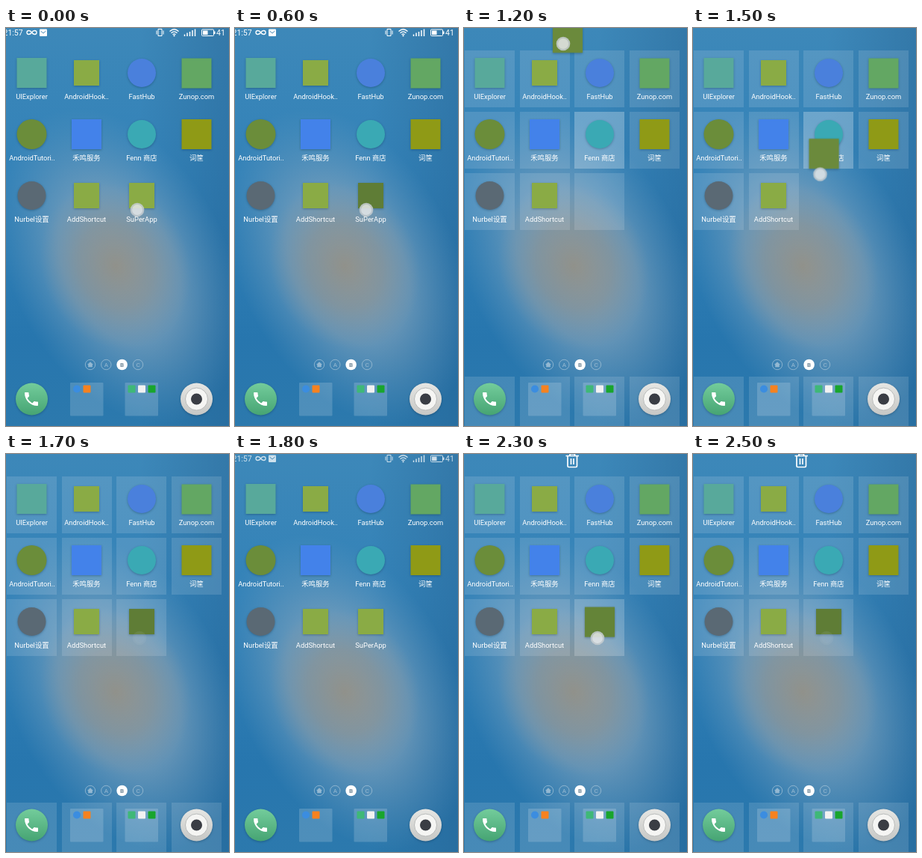
Animation, 299 px wide and 532 px high, one loop 2.6 s. Source, as an HTML page:

```html
<!DOCTYPE html>
<html lang="zh">
<head>
<meta charset="utf-8">
<title>Launcher</title>
<style>
html, body { margin: 0; width: 100%; height: 100%; overflow: hidden; background: #2c7bb2; }
svg { display: block; width: 100vw; height: 100vh; }
text { font: 9.4px Roboto, "Noto Sans CJK SC", "Noto Sans CJK", sans-serif; fill: #fff; text-anchor: middle; }
.bar text { font-size: 10.5px; text-anchor: start; }
.icons > *, .app { filter: drop-shadow(0 1.5px 1.5px rgba(0, 25, 50, .3)); }
.cell { fill: #fff; fill-opacity: .13; }
.line { fill: none; stroke: #fff; }
.pages { fill: none; stroke: #b9d0df; stroke-opacity: .6; }
.pages text { font-size: 8px; fill: #b9d0df; fill-opacity: .75; stroke: none; }
.pages .on { fill: #6f8798; fill-opacity: 1; font-weight: 700; }

/* The screen updates ten times a second, so every change is a hard step. */
.bar, .name, .edit, .trash, .slot, .hot, .app, .touch { animation: 2.6s step-end infinite; }
.bar { animation-name: bar; }
.name { animation-name: name; }
.edit { animation-name: edit; }
.trash { animation-name: trash; }
.slot { animation-name: slot; }
.hot { animation-name: hot; }
.app { animation-name: drag; }
.touch { animation-name: touch; }

@keyframes bar {
  0%, 73.07%, 100% { opacity: 1; }
  38.46%, 80.76% { opacity: 0; }
  69.23% { opacity: .75; }
}
@keyframes name {
  0%, 69.23%, 100% { opacity: 1; }
  38.46%, 80.76% { opacity: 0; }
}
@keyframes edit {
  0%, 69.23%, 100% { opacity: 0; }
  38.46%, 80.76% { opacity: 1; }
}
@keyframes trash {
  0%, 46.15%, 100% { opacity: 0; }
  38.46%, 80.76% { opacity: 1; }
}
@keyframes slot {
  0%, 61.53%, 80.76% { fill-opacity: .2; }
  42.3%, 65.38%, 96.15%, 100% { fill-opacity: .13; }
  57.69% { fill-opacity: 0; }
}
@keyframes hot {
  0%, 61.53%, 100% { fill-opacity: .13; }
  42.3% { fill-opacity: .27; }
}
@keyframes drag {
  0%, 69.23%, 100% { transform: translate(182px, 224px); fill: #8aab45; }
  23.07%, 65.38%, 76.92%, 96.15% { transform: translate(182px, 224px); fill: #5f7d36; }
  38.46%, 61.53%, 80.76% { transform: translate(182px, 224.5px) scale(1.18); fill: #648438; }
  42.3% { transform: translate(161px, 122px) scale(1.18); fill: #6b8a3c; }
  46.15% { transform: translate(139px, 13px) scale(1.18); fill: #6b8a3c; }
  50% { transform: translate(151px, 55px) scale(1.18); fill: #6b8a3c; }
  53.84% { transform: translate(163px, 111px) scale(1.18); fill: #6b8a3c; }
  57.69% { transform: translate(175.5px, 168px) scale(1.18); fill: #6b8a3c; }
}
@keyframes touch {
  0%, 100% { transform: translate(176px, 243px); opacity: .88; }
  42.3% { transform: translate(155px, 132px); opacity: .88; }
  46.15% { transform: translate(133px, 21px); opacity: .88; }
  50% { transform: translate(145px, 79px); opacity: .88; }
  53.84% { transform: translate(158px, 138px); opacity: .88; }
  57.69% { transform: translate(170.5px, 195.5px); opacity: .88; }
  61.53%, 73.07% { transform: translate(179px, 246px); opacity: .88; }
  65.38%, 96.15% { transform: translate(179px, 246px); opacity: .1; }
  69.23% { transform: translate(179px, 246px); opacity: 0; }
}
</style>
</head>
<body>
<svg viewBox="0 0 299 532" preserveAspectRatio="none">
  <defs>
    <linearGradient id="sky" x2="0" y2="1">
      <stop stop-color="#3d88b9"/>
      <stop offset=".35" stop-color="#3382b8"/>
      <stop offset=".78" stop-color="#2776ae"/>
      <stop offset="1" stop-color="#2c79ad"/>
    </linearGradient>
    <linearGradient id="shade">
      <stop offset=".6" stop-color="#1f5583" stop-opacity="0"/>
      <stop offset="1" stop-color="#1f5583" stop-opacity=".3"/>
    </linearGradient>
    <radialGradient id="haze">
      <stop stop-color="#93a9b8" stop-opacity=".85"/>
      <stop offset=".5" stop-color="#87a6bd" stop-opacity=".6"/>
      <stop offset="1" stop-color="#6a9cc0" stop-opacity="0"/>
    </radialGradient>
    <radialGradient id="sand">
      <stop stop-color="#958c7c" stop-opacity=".75"/>
      <stop offset=".5" stop-color="#938f86" stop-opacity=".48"/>
      <stop offset="1" stop-color="#8f9aa0" stop-opacity="0"/>
    </radialGradient>
    <linearGradient id="call" x2="0" y2="1">
      <stop stop-color="#73cc9b"/>
      <stop offset="1" stop-color="#46a473"/>
    </linearGradient>
    <linearGradient id="rim" x2="0" y2="1">
      <stop stop-color="#e6e6e3"/>
      <stop offset="1" stop-color="#c6c7c5"/>
    </linearGradient>
    <rect id="cell" width="67" height="76"/>
    <rect id="tile" x="-20" y="-20" width="40" height="40"/>
    <rect id="small" x="-17" y="-17" width="34" height="34"/>
    <rect id="mini" x="-5" y="-5" width="10" height="10" rx="1"/>
  </defs>

  <rect width="299" height="532" fill="url(#sky)"/>
  <rect width="299" height="532" fill="url(#shade)"/>
  <ellipse cx="152" cy="318" rx="145" ry="225" fill="url(#haze)" transform="rotate(-27 152 318)"/>
  <ellipse cx="147" cy="318" rx="98" ry="115" fill="url(#sand)" transform="rotate(-27 147 318)"/>

  <g class="edit">
    <g class="cell">
      <use href="#cell" x="1" y="30"/><use href="#cell" x="75" y="30"/>
      <use href="#cell" x="148" y="30"/><use href="#cell" x="222" y="30"/>
      <use href="#cell" x="1" y="112"/><use href="#cell" x="75" y="112"/>
      <use href="#cell" x="222" y="112"/>
      <use href="#cell" x="1" y="194"/><use href="#cell" x="75" y="194"/>
      <use href="#cell" x="1" y="466"/><use href="#cell" x="75" y="466"/>
      <use href="#cell" x="148" y="466"/><use href="#cell" x="222" y="466"/>
    </g>
    <use class="cell hot" href="#cell" x="148" y="112"/>
    <use class="cell slot" href="#cell" x="148" y="194"/>
  </g>

  <g class="trash line" stroke-width="1.7">
    <path d="M136.500 2.500H154M142 2.500V0H148.500V2.500M139 3V16Q139 17.500 140.500 17.500H150Q151.500 17.500 151.500 16V3M143.500 6V14M147 6V14"/>
  </g>

  <g class="bar">
    <text x="-3.5" y="10">21:57</text>
    <path class="line" stroke-width="1.4" d="M34.5 6C32.5 3 28 2.5 28 6S32.5 9 34.5 6S41 2.5 41 6S36.5 9 34.5 6"/>
    <rect x="45" y="1.5" width="10" height="9.5" rx="1" fill="#fff"/>
    <path d="M46.5 4L50 7L53.5 4" fill="none" stroke="#4a8cb9"/>
    <path class="line" d="M204 1.500H209V10.500H204ZM202 3.500V8.500M211 3.500V8.500"/>
    <path class="line" stroke-width="1.3" d="M219.5 4.5Q225.5 -1 231.5 4.5M221.5 6.7Q225.5 3 229.5 6.7M223.5 8.7Q225.5 7 227.5 8.7"/>
    <circle cx="225.5" cy="10.3" r="1.1" fill="#fff"/>
    <path class="line" stroke-width="1.5" d="M239.5 11V8.5M243 11V6.5M246.5 11V5M250 11V3M253.5 11V1.5"/>
    <rect class="line" x="262.5" y="2" width="16" height="8.5" rx="1"/>
    <path d="M264 3.500H270.500V9H264ZM279 4.500H280.500V8H279Z" fill="#fff"/>
    <text x="282" y="10">41</text>
  </g>

  <g class="icons">
    <use href="#tile" x="34.5" y="60" fill="#58a99b"/>
    <use href="#small" x="108" y="60" fill="#8aab45"/>
    <circle cx="182" cy="60" r="19" fill="#4a80dc"/>
    <use href="#tile" x="255.5" y="60.5" fill="#63a763"/>
    <circle cx="34.5" cy="142" r="20" fill="#6b8d3a"/>
    <use href="#tile" x="108" y="142" fill="#4382ea"/>
    <circle cx="182" cy="142" r="19" fill="#3aa9b4"/>
    <use href="#tile" x="255.5" y="142" fill="#8f9a16"/>
    <circle cx="34.5" cy="224" r="19" fill="#5a6974"/>
    <use href="#small" x="108" y="224" fill="#8aab45"/>
  </g>

  <g>
    <text x="34.5" y="95">UIExplorer</text>
    <text x="108" y="95">AndroidHook..</text>
    <text x="182" y="95">FastHub</text>
    <text x="255.5" y="95">Zunop.com</text>
    <text x="35" y="177">AndroidTutori..</text>
    <text x="108" y="177">禾鸣服务</text>
    <text x="182" y="177">Fenn 商店</text>
    <text x="255.5" y="177">词筐</text>
    <text x="34.5" y="259">Nurbel设置</text>
    <text x="108" y="259">AddShortcut</text>
    <text class="name" x="182" y="259">SuPerApp</text>
  </g>

  <g class="pages">
    <circle cx="113" cy="450" r="6.7"/>
    <path d="M109 450L113 446.3L117 450H115.800V453.300H110.200V450Z" fill="#b9d0df" fill-opacity=".7" stroke="none"/>
    <circle cx="134.3" cy="450" r="6.7"/>
    <text x="134.3" y="453">A</text>
    <circle cx="155.6" cy="450" r="7.3" fill="#fff" stroke="none"/>
    <text class="on" x="155.6" y="453">B</text>
    <circle cx="177" cy="450" r="6.7"/>
    <text x="177" y="453">C</text>
  </g>

  <g class="icons">
    <circle cx="34.5" cy="496" r="21.5" fill="url(#call)"/>
    <circle cx="255.5" cy="496" r="21.5" fill="url(#rim)"/>
  </g>
  <path transform="translate(22 484)" fill="#fff" d="M6.62 10.79c1.44 2.83 3.76 5.14 6.59 6.59l2.2-2.2c.27-.27.67-.36 1.02-.24 1.12.37 2.33.57 3.57.57.55 0 1 .45 1 1V20c0 .55-.45 1-1 1-9.39 0-17-7.61-17-17 0-.55.45-1 1-1h3.5c.55 0 1 .45 1 1 0 1.25.2 2.45.57 3.57.11.35.03.74-.25 1.02z"/>
  <circle cx="255.5" cy="496" r="15" fill="#f5f5f3" stroke="#b9bbba"/>
  <circle cx="255.5" cy="496" r="7.5" fill="#3a3d44"/>

  <g fill="#fff" fill-opacity=".17">
    <rect x="86" y="474" width="44.5" height="44.5" rx="1"/>
    <rect x="159.5" y="474" width="44.5" height="44.5" rx="1"/>
  </g>
  <circle cx="95" cy="482.5" r="5" fill="#3b8de0"/>
  <use href="#mini" x="108.5" y="482.5" fill="#f58220"/>
  <use href="#mini" x="168.5" y="482.5" fill="#3fb877"/>
  <use href="#mini" x="182" y="482.5" fill="#f2f2f2"/>
  <use href="#mini" x="195.5" y="482.5" fill="#18a52c"/>

  <use class="app" href="#small"/>
  <g class="touch">
    <circle r="9.3" fill="#c5ccd0"/>
    <circle r="7" fill="#e3e6e7"/>
  </g>
</svg>
</body>
</html>
```
